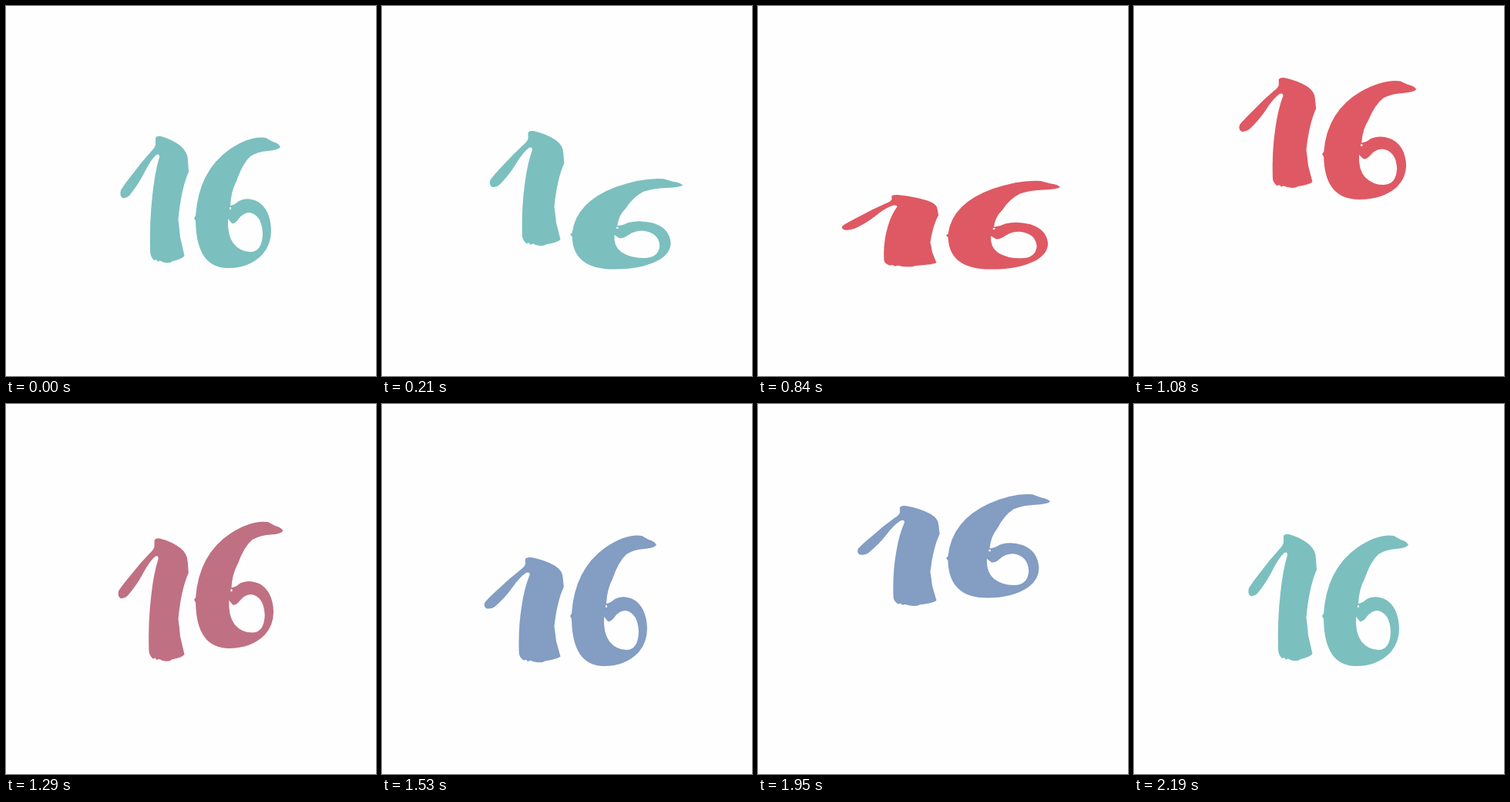
An HTML page for the animation above (2.25 s loop, 480 by 480 pixels).

```html
<!DOCTYPE html>
<html lang="en">
<head>
<meta charset="utf-8">
<title>Jumping 16</title>
<style>
  html, body { margin: 0; width: 100%; height: 100%; overflow: hidden; background: #fefefe; }
  svg { display: block; width: 100%; height: 100%; }
</style>
</head>
<body>
<svg viewBox="0 0 480 480" fill-rule="evenodd">
  <path id="one"/>
  <path id="six"/>
</svg>
<script>
const LOOP = 2250, HOP = 750, STEP = 30;
const PIVOT = { x: 244, y: 345 };
const COLORS = [[124, 191, 191], [222, 89, 99], [131, 157, 195]];

// The lower right edge of the 1 keeps its place while the rest spreads
function onePath(sx) {
  const hold = x => PIVOT.x + (x - PIVOT.x) / sx;
  return `M194 171Q196 168 201 169Q216 173 227 182Q236 190 236 201L237 215
    Q${hold(227)} 238 ${hold(223.5)} 277Q${hold(225)} 288 ${hold(226)} 300L${hold(231.5)} 324
    Q${hold(229)} 328 216 331Q212 335 203 332Q199 329 197 332L195 329L192 330
    Q187 325 187 318Q186 280 190 245Q193 216 199 196Q199 191 195 193
    Q188 199 179 217Q172 231 160 246Q156 250 151 249Q147 246 149 239
    Q153 232 165 217Q176 202 188 189Q195 182 194 177Z`;
}

const sixPath = () => `M356 183Q354 178 346 176L337 171Q317 168 290 186Q250 214 246 272L244 275L246 279
  Q247 340 288 340Q316 340 333 322Q344 309 344 291Q343 264 327 254Q313 247 302 253Q297 258 291 259
  Q292 240 299 227Q307 204 317 195Q326 189 340 188Q353 187 356 183Z
  M288 276L293 282Q297 283 302 276Q308 268 316 268Q332 271 333 296Q332 319 317 319
  Q304 319 295 308Q287 297 288 276ZM290 261h2v3h-2z`;

const digits = [
  { el: document.getElementById('one'), path: onePath, delay: 0, spread: 0.95 },
  { el: document.getElementById('six'), path: sixPath, delay: 30, spread: 1 }
];

const easeOut = u => Math.sin(u * Math.PI / 2);
const easeInOut = u => (1 - Math.cos(u * Math.PI)) / 2;

// Vertical scale keys: [time, value, easing towards it]
const STRETCH = [
  [0, 1],
  [135, 0.5, easeOut],
  [240, 1, easeInOut],
  [450, 0.79, easeOut],
  [530, 1, easeInOut],
  [580, 0.9, easeOut],
  [630, 1, easeInOut]
];

function stretch(t) {
  if (t <= 0) return 1;
  const i = STRETCH.findIndex(key => key[0] > t);
  if (i < 0) return 1;
  const [t0, a] = STRETCH[i - 1], [t1, b, ease] = STRETCH[i];
  return a + (b - a) * ease((t - t0) / (t1 - t0));
}

const height = t => Math.max(0, 102 - 0.0035 * (t - 360) ** 2);

function color(hop, t) {
  const next = COLORS[(hop + 1) % COLORS.length];
  const u = Math.min(1, Math.max(0, (t - 480) / 180));
  return `rgb(${COLORS[hop].map((c, i) => Math.round(c + (next[i] - c) * u))})`;
}

function draw(now) {
  const time = Math.floor(now % LOOP / STEP) * STEP;
  const hop = Math.floor(time / HOP), t = time % HOP;
  for (const { el, path, delay, spread } of digits) {
    const sy = stretch(t - delay), sx = 1 + spread * (1 - sy);
    el.setAttribute('d', path(sx));
    el.setAttribute('transform',
      `translate(${PIVOT.x} ${PIVOT.y - height(t - delay)}) scale(${sx} ${sy}) translate(${-PIVOT.x} ${-PIVOT.y})`);
    el.setAttribute('fill', color(hop, t));
  }
}

let start;
function tick(now) {
  start ??= now;
  draw(now - start);
  requestAnimationFrame(tick);
}
draw(0);
requestAnimationFrame(tick);
</script>
</body>
</html>
```
